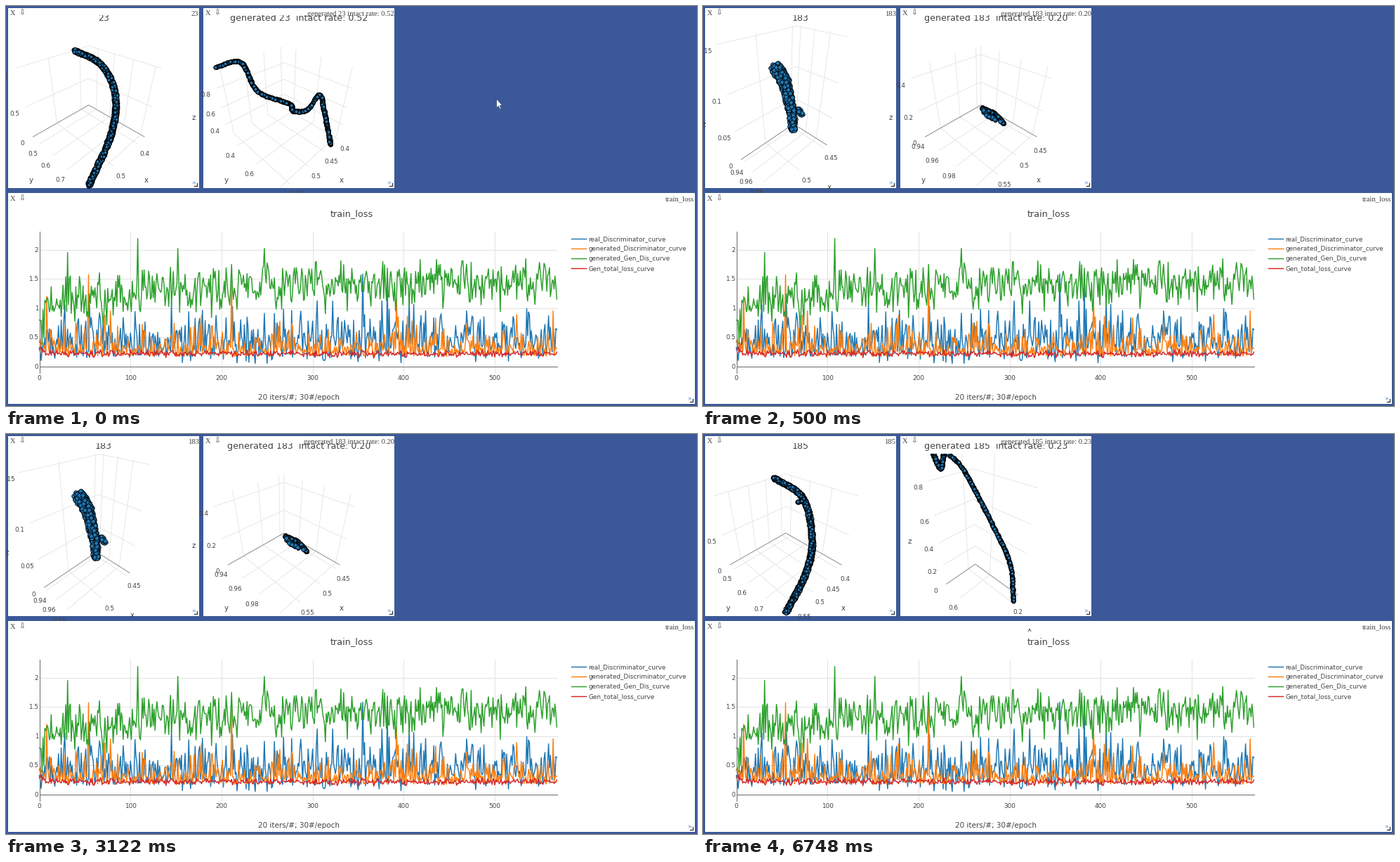
A matplotlib script for the animation above (8000 ms loop, 984 by 569 pixels).

```python
import numpy as np
import matplotlib.pyplot as plt
from matplotlib.animation import FuncAnimation
from matplotlib.collections import LineCollection
from matplotlib.patches import Polygon, Rectangle

W, H, DPI = 984, 569, 100
STEP, LOOP = 50, 8000
STARTS = (0, 500, 4870)
NAVY, INK, GRID = "#3b5998", "#444444", "#e2e2e2"
BLUE, ORANGE, GREEN, RED = "#1f77b4", "#ff7f0e", "#2ca02c", "#d62728"

rng = np.random.default_rng(23)
fig = plt.figure(figsize=(W / DPI, H / DPI), dpi=DPI, facecolor=NAVY)
ax = fig.add_axes([0, 0, 1, 1])
ax.set_xlim(0, W)
ax.set_ylim(H, 0)
ax.axis("off")


def pt(px):
    return px * 72 / DPI


def text(x, y, s, size=8.9, ha="center", color=INK, font="DejaVu Sans", z=5, clip=None):
    """Text whose capitals are centred on y."""
    t = ax.text(x, y + 0.365 * size, s, fontsize=pt(size), ha=ha, va="baseline",
                color=color, family=font, zorder=z)
    if clip is not None:
        t.set_clip_path(clip)
    return t


def line(xs, ys, color, width, z=2):
    return ax.plot(xs, ys, color=color, lw=pt(width), zorder=z, solid_joinstyle="round")[0]


def lines(segments, color, width, clip):
    art = LineCollection(segments, colors=color, linewidths=pt(width), zorder=2)
    ax.add_collection(art, autolim=False)
    art.set_clip_path(clip)
    return art


def box(x0, y0, x1, y1, z):
    return ax.add_patch(Rectangle((x0, y0), x1 - x0, y1 - y0, fc="white", lw=0, zorder=z))


def header(x1, y0, s):
    return text(x1 - 0.5, y0 + 7, s, 10.6, "right", font="Liberation Serif", z=7)


def window(x0, y0, x1, y1):
    frame = box(x0, y0, x1, y1, 1)
    box(x0, y0, x1, y0 + 10.5, 6)
    text(x0 + 6.5, y0 + 7, "X", 10.4, font="Liberation Serif", z=7)
    text(x0 + 20, y0 + 6.5, "\u21e9", 10.5, z=7)
    text(x1 - 8, y1 - 8, "\u00bb", 9.5, color="#5b8fd0", z=7)
    line([x1 - 7, x1 - 3.5, x1 - 3.5], [y1 - 3.5, y1 - 3.5, y1 - 7], "#333333", 1.3, 7)
    return frame


# ---- loss chart ----------------------------------------------------------
N = 569
X0, Y0, SX, SY = 47.5, 512.5, 1.2972, 83.0


def series(values, peaks):
    for k, v in peaks.items():
        values[k] = v
    return values


def loss_chart():
    window(3, 266, 981, 566)
    header(980.8, 266, "train_loss")
    text(492, 294, "train_loss", 12.8)
    text(417, 556.5, "20 iters/#; 30#/epoch", 10.4)
    for k in range(5):
        y = Y0 - k * SY / 2
        line([X0, 785], [y, y], GRID if k else "#6a6a6a", 1, 2 if k else 4)
        text(46.3, y, f"{k / 2:g}", ha="right")
    for k in range(0, 600, 100):
        x = X0 + k * SX
        line([x, x], [321, 522], GRID if k else "#6a6a6a", 1, 2 if k else 4)
        text(x, 528.5, str(k))

    n = np.arange(N)
    trend = 1.46 - 0.38 * np.exp(-n / 170) - 0.4 * np.exp(-n / 6)
    green = trend + np.clip(rng.normal(0, 0.2, N), -0.5, 0.4)
    blue = np.clip(rng.gamma(3.6, 0.13, N), 0.03, 1.12)
    orange = np.clip(0.17 + rng.gamma(1.3, 0.13, N) + 0.2 * np.exp(-n / 8), 0.15, 0.95)
    red = np.clip(rng.normal(0.215, 0.028, N) + 0.06 * np.exp(-n / 12), 0.14, 0.34)
    curves = [
        ("real_Discriminator_curve", series(blue, {355: 1.58, 382: 1.45}), BLUE),
        ("generated_Discriminator_curve",
         series(orange, {8: 1.2, 54: 1.57, 211: 1.48, 392: 1.15}), ORANGE),
        ("generated_Gen_Dis_curve",
         series(green, {31: 1.95, 108: 2.19, 152: 2.02, 247: 2.02, N - 1: 1.15}), GREEN),
        ("Gen_total_loss_curve", red, RED),
    ]
    for k, (name, vals, color) in enumerate(curves):
        line(X0 + SX * n, Y0 - SY * vals, color, 1.47, 3 + k / 10)
        y = 331 + 14 * k
        line([804.5, 826], [y, y], color, 1.47)
        text(829.5, y, name, ha="left")


# ---- 3D panels -----------------------------------------------------------
class Panel:
    """A window whose 3D box is seen from the (1, 1, 1) direction."""
    EYE, ZOOM = 2.165, 260

    def __init__(self, x0, x1):
        self.x0, self.x1 = x0, x1
        self.frame = window(x0, 2.5, x1, 259)
        self.clip = Rectangle((x0, 28), x1 - x0, 231, transform=ax.transData)

    def project(self, x, y, z):
        k = self.ZOOM / (self.EYE - (x + y + z) / 3 ** 0.5)
        return (self.x0 + 115 + k * (y - x) / 2 ** 0.5,
                143.7 - k * (2 * z - x - y) / 6 ** 0.5)

    def titles(self, title, short):
        mid = (self.x0 + self.x1) / 2
        return [text(mid, 16.3, title, 12.65), header(self.x1, 3, short)]

    def axes(self, half, xs, ys, zs):
        """Grid and labels; half is the box's half size, xs.. are (low, high, step)."""
        a, b, c = half
        P = self.project
        arts, grid = [], []

        def label(place, dx, dy, s, size=8.9):
            px, py = place
            arts.append(text(px + dx, py + dy, s, size, clip=self.frame))

        def ticks(low, high, step, h):
            for k in range(int(np.ceil(low / step - 1e-9)), int(high / step + 1e-9) + 1):
                yield f"{k * step:g}", (2 * (k * step - low) / (high - low) - 1) * h

        for s, x in ticks(*xs, a):
            grid.append([P(x, -b, c), P(x, -b, -c), P(x, b, -c)])
            label(P(x, b, -c), 10, 14, s)
        for s, y in ticks(*ys, b):
            grid.append([P(-a, y, c), P(-a, y, -c), P(a, y, -c)])
            label(P(a, y, -c), -10, 14, s)
        for s, z in ticks(*zs, c):
            grid.append([P(a, -b, z), P(-a, -b, z), P(-a, b, z)])
            label(P(a, -b, z), -15, 9, s)
        label(P(0, b, -c), 36, 29, "x", 10.3)
        label(P(a, 0, -c), -37, 29, "y", 10.3)
        label(P(a, -b, 0), -39, 15, "z", 10.3)
        arts.append(lines(grid, GRID, 0.8, self.clip))
        if zs[0] == 0:
            floor = [P(a, -b, -c), P(-a, -b, -c), P(-a, b, -c)]
            arts.append(lines([floor], "#8c8c8c", 0.9, self.clip))
        return arts

    def cloud(self, path, n, spread=(3, 3), size=4.8, edge=0.95):
        """Dots scattered round a smooth path; spread goes from its start to its end."""
        p = np.array(path, float)
        q = np.vstack([2 * p[0] - p[1], p, 2 * p[-1] - p[-2]])
        reach = np.r_[0, np.cumsum(np.hypot(*np.diff(p, axis=0).T))]
        along = rng.uniform(0, 1, n)
        u = np.interp(along * reach[-1], reach, np.arange(len(p)))
        i = np.minimum(u.astype(int), len(p) - 2)
        t = (u - i)[:, None]
        a, b, c, d = q[i], q[i + 1], q[i + 2], q[i + 3]
        x, y = (b + t / 2 * (c - a + t * (2 * a - 5 * b + 4 * c - d
                                          + t * (3 * (b - c) + d - a)))).T
        r = (spread[0] + along * (spread[1] - spread[0])) * np.sqrt(rng.uniform(0, 1, n))
        turn = rng.uniform(0, 2 * np.pi, n)
        dots, = ax.plot(x + r * np.cos(turn), y + r * np.sin(turn), "o", ms=pt(size),
                        mfc=BLUE, mec="black", mew=pt(edge), zorder=4)
        dots.set_clip_path(self.clip)
        return dots


real, fake = Panel(2.8, 275), Panel(280.8, 553.2)
CUBE = (0.53, 0.53, 0.49)


def titles(num, rate):
    name = f"generated {num}  intact rate: {rate}"
    return (real.titles(str(num), str(num))
            + fake.titles(name, name.replace("  ", " ")))


def pointer(x, y):
    shape = [(0, 0), (0, 13), (2.8, 10.4), (5, 15), (6.8, 14.2), (4.7, 9.8), (8.2, 9.5)]
    return ax.add_patch(Polygon(np.add(shape, (x, y)), fc="white", ec="#2b3f6b",
                                lw=0.5, zorder=8))


def first():
    return [
        *titles(23, "0.52"),
        *real.axes(CUBE, (0.365, 0.582, 0.1), (0.437, 0.823, 0.1), (0, 1, 0.5)),
        real.cloud([(97, 63), (135, 83), (155, 125), (150, 180), (118, 254)], 2400, (2.6, 3)),
        *fake.axes(CUBE, (0.391, 0.565, 0.05), (0.288, 0.824, 0.2), (0.239, 0.98, 0.2)),
        fake.cloud([(298, 87), (334, 80), (358, 121), (403, 139), (408, 149), (429, 147),
                    (446, 126), (453, 150), (462, 197)], 700, (0.8, 1), 5.2, 1.2),
        pointer(698.5, 132),
    ]


def second():
    return [
        *titles(183, "0.20"),
        *real.axes((0.53, 0.34, 0.79), (0.443, 0.54, 0.05), (0.934, 0.999, 0.02),
                   (0, 0.152, 0.05)),
        real.cloud([(135, 147), (140, 154)], 25, (4, 2), 5.6, 0.75),
        real.cloud([(104, 88), (114, 104), (121, 128), (126, 155), (128, 176)], 850,
                   (9, 4), 5.6, 0.75),
        *fake.axes(CUBE, (0.437, 0.585, 0.05), (0.94, 1.004, 0.02), (0, 0.455, 0.2)),
        fake.cloud([(397, 145), (415, 153), (428, 167)], 150, (0.8, 0.8), 5.4, 1.2),
        fake.cloud([(397, 146), (406, 156), (424, 165)], 35, (1.5, 1.5), 5.6, 0.8),
    ]


def third():
    return [
        *titles(185, "0.23"),
        *real.axes(CUBE, (0.382, 0.583, 0.05), (0.466, 0.799, 0.1), (0, 1, 0.5)),
        real.cloud([(101, 62), (142, 91), (155, 150), (146, 198), (118, 253)], 2400, (2.6, 3)),
        real.cloud([(134, 97), (141, 95)], 25, (1, 1)),
        *fake.axes((0.31, 0.45, 1), (0.148, 0.35, 0.2), (0.5, 0.76, 0.2), (0, 0.99, 0.2)),
        fake.cloud([(326, 24), (338, 49), (343, 24)], 190, (1, 1), 5.4, 1.2),
        fake.cloud([(345, 24), (372, 53), (415, 135), (437, 185), (442, 239)], 480,
                   (1, 0.8), 5, 1.1),
    ]


loss_chart()
scenes = [first(), second(), third()]


def update(i):
    now = sum(s // STEP <= i for s in STARTS) - 1
    for k, arts in enumerate(scenes):
        for art in arts:
            art.set_visible(k == now)
    return []


update(0)
anim = FuncAnimation(fig, update, frames=LOOP // STEP, interval=STEP, repeat=True,
                     repeat_delay=0, blit=False)
plt.show()
```
